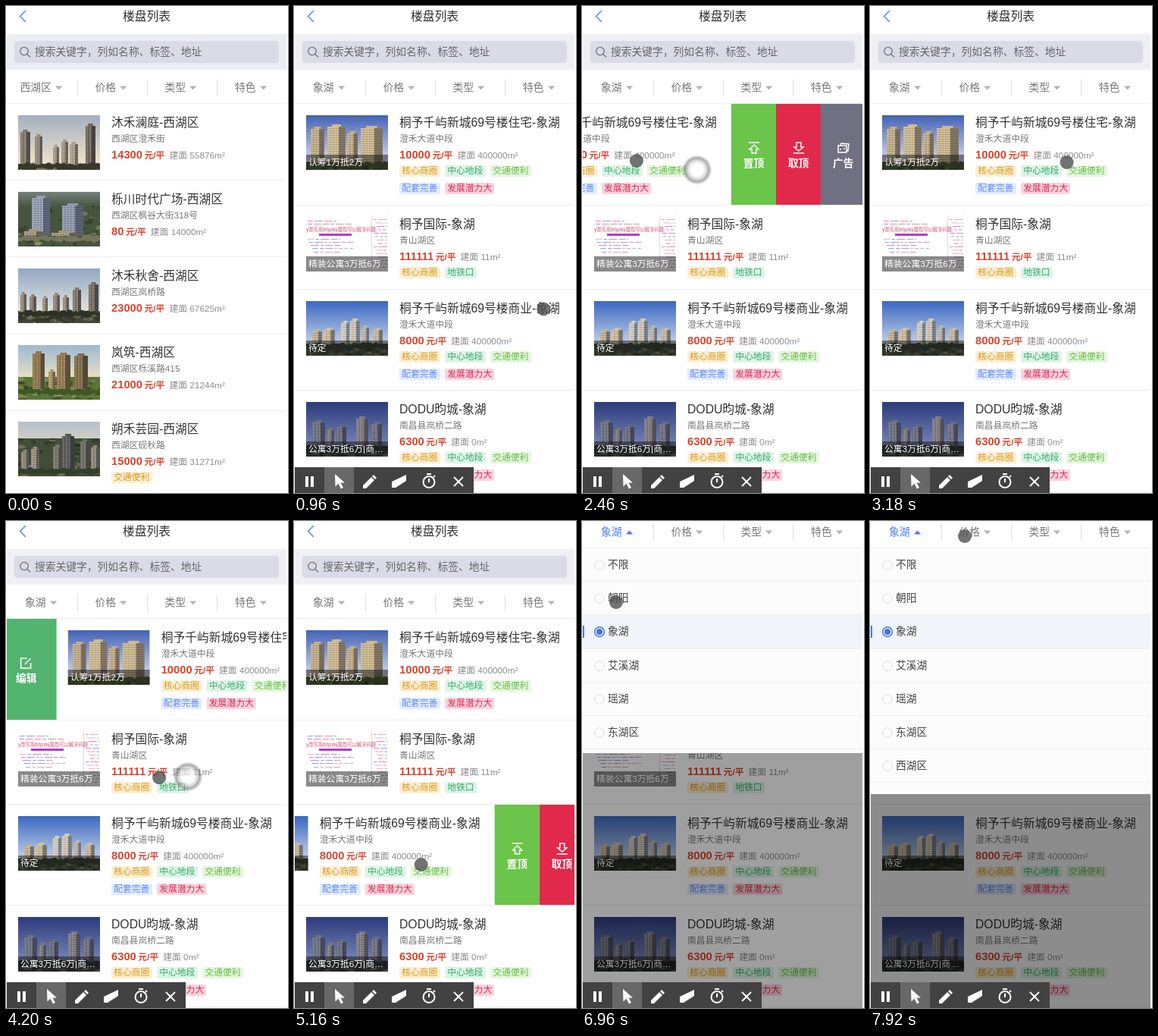
An HTML page with a canvas that plays this animation: 372 by 642 pixels, repeating every 8000 ms.

```html
<!DOCTYPE html>
<html lang="zh-CN">
<head>
<meta charset="utf-8">
<title>楼盘列表</title>
<style>
html, body { margin: 0; width: 100%; height: 100%; overflow: hidden; background: #fff; }
#stage { position: relative; width: 372px; height: 642px; overflow: hidden; background: #fff;
  font-family: "Liberation Sans", "Noto Sans CJK SC", "Noto Sans CJK", sans-serif; color: #333; }
#stage * { position: absolute; box-sizing: border-box; }
.t { height: 20px; line-height: 20px; white-space: nowrap; }
#stage .t > * { position: static; }
.mid { text-align: center; }
.row { left: 0; width: 370px; clip-path: inset(0 0 -1px 1px); }
.slide { left: 0; top: 0; width: 370px; height: 100%; }
.line { left: 1px; width: 369px; height: 1px; bottom: -.25px; background: #ececec; }
.tag { height: 15px; line-height: 15px; padding: 0 3.2px; font-size: 11.8px; border-radius: 2px; white-space: nowrap; }
.cap { left: 16px; width: 108px; height: 20px; line-height: 20px; padding-left: 3px; color: #fff;
  font-size: 11.8px; background: rgba(20,20,20,.5); white-space: nowrap; }
.btn { top: 0; height: 100%; }
.layer { left: 0; top: 0; width: 372px; height: 642px; }
svg { overflow: visible; }
</style>
</head>
<body>
<div id="stage"></div>
<script>
const LOOP = 8000, W = 372, H = 642, BAR = 107, BTN = 59, EDIT = 78.7;
const stage = document.getElementById('stage');

function el(parent, cls, css = {}, html = '', tag = 'div') {
  const e = document.createElement(tag);
  e.className = cls;
  for (const k in css) e.style[k] = typeof css[k] === 'number' ? css[k] + 'px' : css[k];
  e.innerHTML = html;
  parent.appendChild(e);
  return e;
}
const text = (p, x, y, size, color, str) =>
  el(p, 't', { left: x, top: y - 10, fontSize: size, color }, str);
const svg = (p, x, y, w, h, body) =>
  el(p, '', { left: x, top: y, width: w, height: h },
    `<svg width="${w}" height="${h}" fill="none" stroke="#fff" stroke-width="1.5">${body}</svg>`);

// ---- pictures -------------------------------------------------------------
function seeded(s) {
  return () => (s = (s * 16807) % 2147483647) / 2147483647;
}

function tower(c, x, w, top, base, color) {
  c.fillStyle = color;
  c.fillRect(x, top, w, base - top);
  c.fillRect(x + w * .25, top - 3, w * .5, 3);
  c.fillStyle = 'rgba(20,20,35,.4)';
  c.fillRect(x + w * .62, top, w * .38, base - top);
  c.fillStyle = 'rgba(25,25,40,.2)';
  for (let y = top + 2; y < base; y += 3) c.fillRect(x + 1, y, w - 2, 1);
  c.fillStyle = 'rgba(255,245,220,.3)';
  for (let i = 1.5; i < w * .6; i += 4) c.fillRect(x + i, top, 1, base - top);
}

// towers: [x, width, top, colour]
function scene(c, p, seed) {
  const r = seeded(seed * 977 + 5);
  const g = c.createLinearGradient(0, 0, 0, p.base);
  g.addColorStop(0, p.sky[0]);
  g.addColorStop(1, p.sky[1]);
  c.fillStyle = g;
  c.fillRect(0, 0, 108, 72);
  c.fillStyle = p.ground;
  c.fillRect(0, p.base, 108, 72);
  for (let i = 0; i < 60; i++) {
    c.fillStyle = i % 3 ? 'rgba(20,30,15,.3)' : 'rgba(215,205,150,.28)';
    c.beginPath();
    c.ellipse(r() * 108, p.base + r() * (72 - p.base), 2 + r() * 4, 1 + r() * 2, 0, 0, 7);
    c.fill();
  }
  for (const [x, w, top, color] of p.towers) tower(c, x, w, top, p.foot || p.base + 2, color);
  c.fillStyle = p.trees;
  for (let x = 0; x < 110; x += 4) {
    c.beginPath();
    c.arc(x, (p.foot || p.base) + 2 + r() * 3, 2 + r() * 2.5, 0, 7);
    c.fill();
  }
}

function codeShot(c) {
  const r = seeded(41);
  c.fillStyle = '#fff';
  c.fillRect(0, 0, 108, 72);
  const tones = ['#d55a6a', '#a84bc0', '#5570c8', '#c98a9a'];
  const dashes = (x0, x1, y) => {
    for (let x = x0; x < x1;) {
      const w = 3 + r() * 9;
      c.fillStyle = tones[Math.floor(r() * 4)];
      c.globalAlpha = .65;
      c.fillRect(x, y, Math.min(w, x1 - x), 1);
      x += w + 2;
    }
    c.globalAlpha = 1;
  };
  for (let i = 0; i < 15; i++) dashes(89 + (i % 4) * 2, 107, 3 + i * 4.5);
  dashes(2, 40, 5);
  dashes(2, 60, 9);
  c.fillStyle = '#d8d8de';
  c.fillRect(86, 0, 1, 72);
  c.fillStyle = '#b33bd0';
  c.fillRect(17, 22, 43, 3);
  c.fillStyle = '#d0506a';
  c.font = '7px "Liberation Sans", "Noto Sans CJK SC", sans-serif';
  c.fillText('y改写用display属性可以解决问题', 0, 19, 92);
  [29, 33, 37, 41, 46].forEach((y, i) => dashes(2 + i * 2, 45 + (i * 17) % 34, y));
}

const photos = [
  { sky: ['#a3b0c2', '#eee2ca'], base: 64, ground: '#59503b', trees: '#36382a', towers: [
    [3, 13, 22, '#82776a'], [22, 10, 28, '#958a7a'], [46, 8, 42, '#a89c88'], [57, 9, 35, '#a49884'],
    [68, 11, 38, '#b0a288'], [89, 13, 14, '#706256']] },
  { sky: ['#75827a', '#46543f'], base: 20, foot: 58, ground: '#48553e', trees: '#77745c', towers: [
    [18, 24, 8, '#929eb4'], [58, 28, 18, '#8c97ac'], [8, 26, 52, '#a5987f'], [44, 38, 54, '#a09680']] },
  { sky: ['#93a8c2', '#dee2e0'], base: 56, ground: '#444638', trees: '#2c3224', towers: [
    [3, 8, 34, '#978a7a'], [15, 9, 37, '#8d8172'], [32, 7, 39, '#a09482'], [46, 9, 35, '#93877a'],
    [59, 8, 38, '#998c78'], [72, 11, 28, '#82766a'], [93, 13, 21, '#796c60']] },
  { sky: ['#9db9d2', '#e6dfc4'], base: 42, foot: 58, ground: '#5b7438', trees: '#3f5825', towers: [
    [19, 16, 11, '#8f7748'], [51, 18, 13, '#94794c'], [74, 18, 14, '#806c46'], [40, 9, 35, '#b09a68']] },
  { sky: ['#b4bfca', '#cfcfc4'], base: 22, foot: 62, ground: '#414d36', trees: '#333f2a', towers: [
    [4, 10, 40, '#8c867a'], [17, 11, 36, '#968e82'], [46, 12, 33, '#77736a'], [58, 16, 19, '#585956'],
    [82, 12, 26, '#6a6a64'], [96, 11, 34, '#8d867a']] },
  { sky: ['#4462b4', '#d6dcee'], base: 62, ground: '#4d5c32', trees: '#43532a', towers: [
    [6, 18, 18, '#c2ae88'], [28, 24, 15, '#cfbb93'], [54, 14, 24, '#c3ad84'], [72, 29, 17, '#cdb98f']] },
  null,
  { sky: ['#3a68c0', '#c2d0e8'], base: 56, ground: '#46523a', trees: '#2f3d28', towers: [
    [8, 13, 40, '#c2b494'], [23, 15, 38, '#cdbf9f'], [46, 11, 29, '#d3cfc4'], [58, 13, 26, '#cfc9ba'],
    [74, 9, 35, '#bdb6a8'], [88, 13, 38, '#c6baa0']] },
  { sky: ['#2c3b7c', '#7685b4'], base: 58, ground: '#383d40', trees: '#282f30', towers: [
    [8, 17, 27, '#6c7084'], [28, 9, 37, '#7d7a7e'], [40, 13, 33, '#676b7e'], [66, 16, 22, '#7e7b82'],
    [86, 14, 29, '#6c6e80']] }
];

function photo(p, y, i) {
  const cv = el(p, '', { left: 16, top: y }, '', 'canvas');
  cv.width = 108;
  cv.height = 72;
  const c = cv.getContext('2d');
  photos[i] ? scene(c, photos[i], i + 1) : codeShot(c);
}

// ---- rows -----------------------------------------------------------------
const tones = {
  gold: ['#d8981c', '#fcefd2'], jade: ['#34ad68', '#def4e6'], leaf: ['#66bf48', '#e5f6de'],
  blue: ['#5f8cfa', '#e2ebff'], rose: ['#de2850', '#fbd3dd']
};
const core = ['核心商圈', 'gold'], hub = ['中心地段', 'jade'], easy = ['交通便利', 'leaf'],
  full = ['配套完善', 'blue'], rise = ['发展潜力大', 'rose'], metro = ['地铁口', 'jade'];
const five = [core, hub, easy, full, rise];

const icons = {
  up: 'M2 2H16M9 5L15 11H12V16H6V11H3Z',
  down: 'M2 16H16M9 13L15 8H12V2H6V8H3Z',
  ad: 'M2 6H13V15H2ZM5 6L6 3L16 4L15 13H13M5 12V10M9 10H11',
  edit: 'M10 3H2V16H15V9M7 11L15 3'
};

function button(p, x, w, color, icon, label) {
  const b = el(p, 'btn', { left: x, width: w, background: color });
  svg(b, w / 2 - 9, 49, 18, 18, `<path d="${icons[icon]}"/>`);
  const t = text(b, 0, 79, 13.78, '#fff', `<b>${label}</b>`);
  t.style.width = w + 'px';
  t.classList.add('mid');
}

function row(p, top, h, pic, [title, addr, price, area, tags, cap], swipe) {
  const box = el(p, 'row', { top, height: h });
  const s = el(box, 'slide');
  photo(s, 15, pic);
  if (cap) el(s, 'cap', { top: 67 }, cap);
  text(s, 139, 24.5, 15.75, '#333', title);
  text(s, 139, 46, 11.8, '#777', addr);
  text(s, 139, 67, 11.8, '#8c8c8c', `<b style="font-size:14.76px;color:#d8452f">${price}</b>` +
    `<b style="color:#d8452f;margin:0 6px 0 2.5px">元/平</b>建面 ${area}m²`);
  tags.forEach(([name, tone], i) => el(s, 'tag', {
    left: 139 + (i % 3) * 60, top: 81 + Math.floor(i / 3) * 22.6,
    color: tones[tone][0], background: tones[tone][1]
  }, name));
  if (swipe) {
    button(s, -EDIT, EDIT + 1, '#52b46e', 'edit', '编辑');
    button(s, 370, BTN, '#6ac54a', 'up', '置顶');
    button(s, 370 + BTN, BTN, '#e1294b', 'down', '取顶');
    button(s, 370 + BTN * 2, BTN, '#6f7182', 'ad', '广告');
  }
  el(box, 'line');
  return s;
}

const first = el(stage, 'layer'), second = el(stage, 'layer');
[
  ['沐禾澜庭-西湖区', '西湖区澄禾街', '14300', '55876', []],
  ['栎川时代广场-西湖区', '西湖区枫谷大街318号', '80', '14000', []],
  ['沐禾秋舍-西湖区', '西湖区岚桥路', '23000', '67625', []],
  ['岚筑-西湖区', '西湖区栎溪路415', '21000', '21244', []],
  ['朔禾芸园-西湖区', '西湖区砚秋路', '15000', '31271', [['交通便利', 'gold']]]
].forEach((d, i) => row(first, 129 + i * 101.1, i < 4 ? 101.1 : 120, i, d));

const tops = [129, 263, 374, 507, 641];
const slides = [
  ['桐予千屿新城69号楼住宅-象湖', '澄禾大道中段', '10000', '400000', five, '认筹1万抵2万'],
  ['桐予国际-象湖', '青山湖区', '111111', '11', [core, metro], '精装公寓3万抵6万'],
  ['桐予千屿新城69号楼商业-象湖', '澄禾大道中段', '8000', '400000', five, '待定'],
  ['DODU昀城-象湖', '南昌县岚桥二路', '6300', '0', five, '公寓3万抵6万|商…']
].map((d, i) => row(second, tops[i], tops[i + 1] - tops[i], 5 + i, d, true));

// ---- header, search, filter -------------------------------------------------
const head = el(stage, '', { left: 0, top: 0, width: W, height: 85, background: '#fff' });
svg(head, 0, 0, 40, 37, '<path d="M26 6L18.5 13.5L26 21" stroke="#5b8bf0"/>');
const title = text(head, 0, 13.5, 15.75, '#333', '楼盘列表');
title.style.width = '371px';
title.classList.add('mid');
const strip = el(head, '', { left: 1, top: 37, width: 369, height: 47 });
el(head, '', { left: 11, top: 46, width: 349, height: 29, borderRadius: 4, background: '#d9dce7' });
svg(head, 17, 52, 18, 18, '<g stroke="#777" stroke-width="1.3"><circle cx="7" cy="7.5" r="5.2"/><path d="M11 11.5L15 15.5"/></g>');
text(head, 38, 60.5, 13.78, '#666', '搜索关键字，列如名称、标签、地址');

const mask = el(stage, '', { left: 1, top: 35, width: 369, height: 607, background: '#000' });
const panel = el(stage, '', { left: 0, top: 35, width: 370, overflow: 'hidden', background: '#fcfcfd' });
['不限', '朝阳', '象湖', '艾溪湖', '瑶湖', '东湖区', '西湖区'].forEach((name, i) => {
  const on = i === 2;
  const o = el(panel, '', { left: 1, top: 1 + i * 44.2, width: 369, height: 44.2,
    background: on ? '#f1f5f9' : '#fcfcfd', borderBottom: '1px solid #eeeff1' });
  if (on) el(o, '', { left: 0, top: 14, width: 2, height: 16, background: '#4a78e8' });
  svg(o, 14, 14, 16, 16, on
    ? '<circle cx="8" cy="8" r="6.3" stroke="#3f73ee"/><circle cx="8" cy="8" r="4" fill="#3f73ee" stroke="none"/>'
    : '<circle cx="8" cy="8" r="6.3" stroke="#dcdee2" stroke-width="1"/>');
  text(o, 33, 22, 13.78, '#444', name);
});

const bar = el(stage, '', { left: 0, width: 370, height: 44, background: '#fff' });
el(bar, 'line');
[94, 186, 278].forEach(x => el(bar, '', { left: x, top: 12, width: 1, height: 22, background: '#dedfe3' }));
function filter(x, name, color = '#777', open) {
  const f = el(bar, '', { left: x, top: 0 });
  text(f, 0, 22.5, 13.78, color, name);
  svg(f, name.length * 13.78 + 5, 20, 10, 6, open
    ? `<path d="M0 5.5L4.6 .5L9.2 5.5Z" fill="${color}" stroke="none"/>`
    : '<path d="M0 .5H9.2L4.6 5.5Z" fill="#b2b4bb" stroke="none"/>');
  return f;
}
filter(117.5, '价格');
filter(209.5, '类型');
filter(302, '特色');
const areas = [filter(18.5, '西湖区'), filter(25, '象湖'), filter(25, '象湖', '#4a7df2', true)];

// ---- pointer and recorder bar -------------------------------------------------
const pad = el(stage, 'layer', {}, '', 'canvas');
pad.width = W;
pad.height = H;
const ctx = pad.getContext('2d');

const tools = el(stage, '', { left: 1, top: 608, width: 236, height: 34, background: '#424242' });
el(tools, '', { left: 39, top: 0, width: 39, height: 34, background: '#686868' });
svg(tools, 0, -1, 236, 35, `<g fill="#fff" stroke="none">
  <path d="M14 13h4v14h-4zM21 13h4v14h-4z"/>
  <path d="M53 10L66 21.5H60.5L64 28L61 29.5L57.5 22.5L53.5 26.5Z"/>
  <path d="M90 29V25L101 14L105 18L94 29ZM102 13L104 11L108 15L106 17Z"/>
  <path d="M128 20L147 11V19L133 28H128Z"/><path d="M174 9h6v2h-6z"/></g>
  <g stroke-width="2"><circle cx="177" cy="20.5" r="7.5"/><path d="M177 16V21M183 14L185 12M210 14L222 26M222 14L210 26"/></g>`);

// ---- motion -------------------------------------------------------------------
// keys: [time, ...values], joined by straight runs
function track(keys, t) {
  if (t <= keys[0][0]) return keys[0].slice(1);
  for (let i = 1; i < keys.length; i++) {
    const a = keys[i - 1], b = keys[i];
    if (t < b[0]) {
      const k = (t - a[0]) / (b[0] - a[0]);
      return a.slice(1).map((v, j) => v + (b[j + 1] - v) * k);
    }
  }
  return keys[keys.length - 1].slice(1);
}

const swipeTop = [[1860, 0], [1920, -19], [2460, -173], [2520, -177], [2820, -177], [3180, 0],
  [3600, 0], [3960, EDIT], [4140, EDIT], [4200, 66], [4380, 0]];
const swipeThird = [[4800, 0], [5160, -105], [5400, -177], [5640, -177], [5940, 0]];
const dotPath = [[900, 330, 420], [1500, 323, 218], [1620, 310, 217], [1740, 293, 217], [1920, 253, 217],
  [2460, 72, 204], [2700, 62, 204], [2820, 80, 204], [3180, 260, 206], [3560, 110, 212],
  [3960, 200, 215], [4200, 202, 338], [4720, 275, 450], [4800, 273, 453], [5160, 168, 453],
  [5400, 92, 452], [5640, 100, 420], [6180, 147, 165], [6660, 45, 107], [7200, 45, 107],
  [7480, 90, 250], [7620, 98, 203], [7760, 88, 102], [7920, 125, 20]];
const ringPath = [[1860, 270, 217, .55], [1920, 270, 217, .55], [2460, 152, 216, .55], [2640, 110, 210, 0],
  [4060, 240, 337, 0], [4140, 240, 337, .55], [4200, 240, 337, .55], [4380, 240, 337, 0]];
const openKeys = [[6700, 0], [7140, 1]];

function pointer(t) {
  ctx.clearRect(0, 0, W, H);
  if (t < 900) return;
  const [rx, ry, a] = track(ringPath, t);
  if (t > 1860 && a > 0) {
    const g = ctx.createRadialGradient(rx, ry, 8, rx, ry, 20);
    g.addColorStop(0, `rgba(255,255,255,${a})`);
    g.addColorStop(.35, `rgba(190,190,190,${a})`);
    g.addColorStop(.65, `rgba(100,100,100,${a})`);
    g.addColorStop(1, 'rgba(150,150,150,0)');
    ctx.fillStyle = g;
    ctx.beginPath();
    ctx.arc(rx, ry, 20, 0, 7);
    ctx.fill();
  }
  const [x, y] = track(dotPath, t);
  ctx.fillStyle = 'rgba(75,75,75,.78)';
  ctx.beginPath();
  ctx.arc(x, y, 9, 0, 7);
  ctx.fill();
}

const show = (e, on) => { e.style.display = on ? '' : 'none'; };

function draw(t) {
  const live = t >= 900, open = t >= 6700;
  const k = track(openKeys, t)[0], ease = 1 - (1 - k) * (1 - k);
  show(first, !live);
  show(second, live);
  show(tools, live);
  show(head, !open);
  show(mask, open);
  show(panel, open);
  areas.forEach((e, i) => show(e, i === (open ? 2 : live ? 1 : 0)));
  strip.style.background = live ? '#f0eff4' : '#eaedf4';
  bar.style.top = (open ? -8 : BAR - 22) + 'px';
  mask.style.opacity = .45 * ease;
  panel.style.height = 325 * ease + 'px';
  slides[0].style.transform = `translateX(${track(swipeTop, t)[0]}px)`;
  slides[2].style.transform = `translateX(${track(swipeThird, t)[0]}px)`;
  pointer(t);
}

const start = performance.now();
function tick() {
  draw((performance.now() - start) % LOOP);
  requestAnimationFrame(tick);
}
tick();
</script>
</body>
</html>
```
